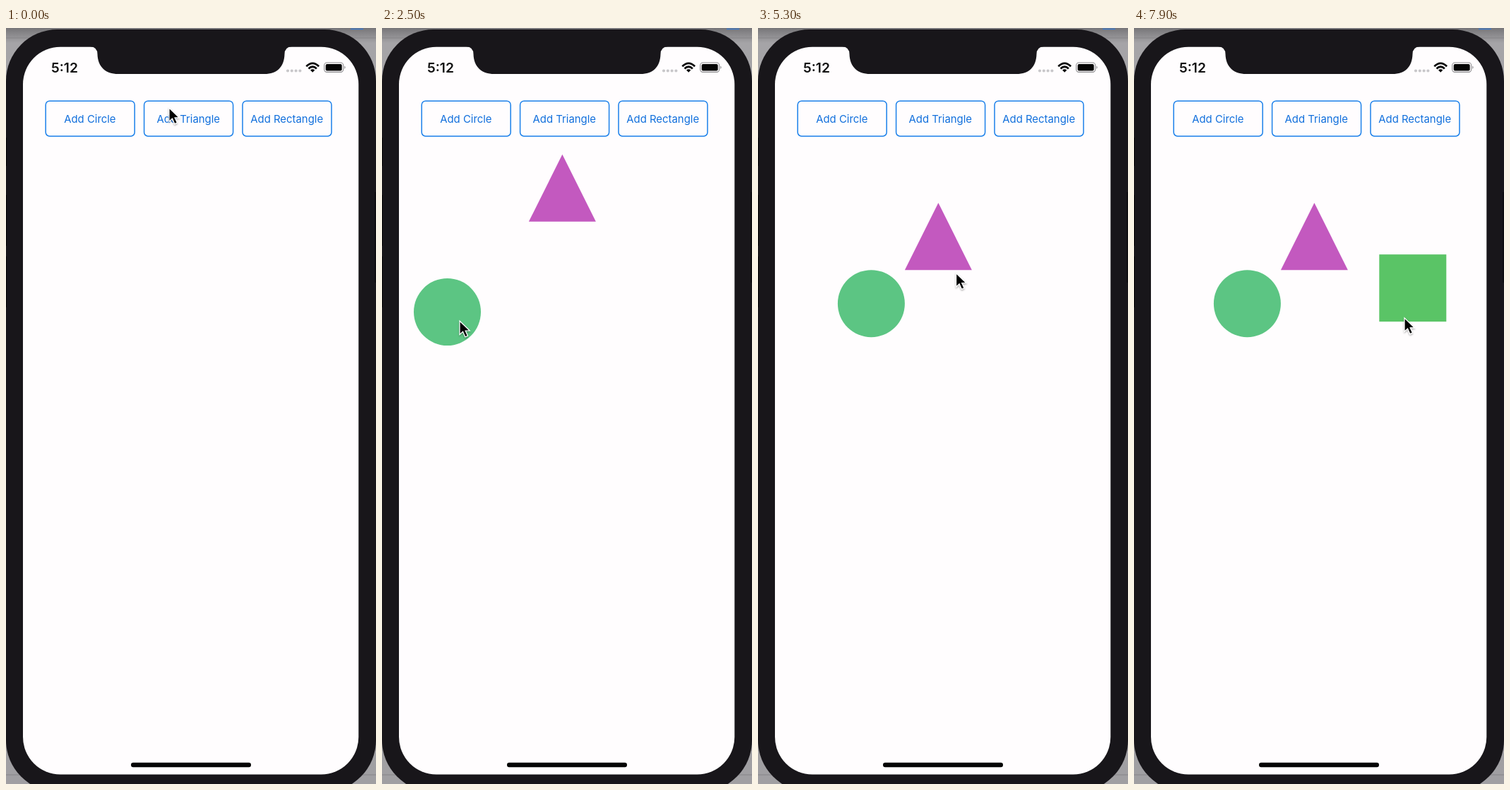
Write an HTML page that moves like this. It is 524x1069 px and loops after 8 s.

```html
<!DOCTYPE html>
<html lang="en">
<head>
<meta charset="utf-8">
<title>Shape alignment guides</title>
<style>
html, body { margin: 0; width: 100%; height: 100%; overflow: hidden; background: #aaa9ac; }
svg { display: block; width: 100vw; height: 100vh; }
text { font-family: Inter, "Liberation Sans", sans-serif; }
</style>
</head>
<body>
<svg viewBox="0 0 524 1069" preserveAspectRatio="none">
  <defs>
    <linearGradient id="shade" x2="0" y2="1">
      <stop offset="0" stop-color="#777679"/>
      <stop offset=".02" stop-color="#a5a4a7"/>
      <stop offset="1" stop-color="#a09fa2"/>
    </linearGradient>
    <filter id="soft" x="-50%" y="-50%" width="200%" height="200%">
      <feDropShadow dx="0" dy="1.5" stdDeviation="1.2" flood-opacity=".35"/>
    </filter>
  </defs>

  <rect width="524" height="1069" fill="url(#shade)"/>
  <path d="M0 14H524M0 1056H524" stroke="#858487"/>
  <path d="M488 1.5H506" stroke="#3d78c8" stroke-width="1.5"/>
  <rect y="2" width="524" height="1078" rx="73" fill="#18161a"/>
  <path d="M.5 155V195M.5 236V308M.5 323V395M523 232V360" stroke="#050506"/>
  <rect x="24" y="26.7" width="475.3" height="1028.8" rx="53" fill="#fffdfe"/>
  <path d="M119 26Q129.5 27 129.5 37C130 55 141 65 159 65H366C384 65 394 55 394.5 37Q394.5 27 405 26Z" fill="#18161a"/>

  <text x="64" y="62.6" font-size="19.2" font-weight="600" fill="#111">5:12</text>
  <path d="M399 60.5H417" stroke="#c8c7ca" stroke-width="4.2" stroke-linecap="round" stroke-dasharray="0 5.8"/>
  <g fill="none" stroke="#080808" stroke-width="2.7">
    <path d="M425.3 54.3Q434.2 45.4 443.1 54.3M428.5 57.5Q434.2 52 439.9 57.5"/>
    <path d="M431 59.4Q434.2 57 437.4 59.4L434.2 62.8Z" fill="#080808" stroke="none"/>
  </g>
  <rect x="450.7" y="49" width="27" height="13.4" rx="3.8" fill="none" stroke="#8c8b8e" stroke-width="1.1"/>
  <rect x="452.7" y="51" width="23" height="9.4" rx="2" fill="#050505"/>
  <path d="M479.3 53.5Q482 55.7 479.3 58Z" fill="#8c8b8e"/>
  <rect x="177" y="1038.8" width="170" height="6.4" rx="3.2" fill="#050505"/>

  <g id="buttons"></g>
  <circle id="circle" r="47.5" fill="#5cc583"/>
  <path id="triangle" d="M0-47.5L47.5 47.5H-47.5Z" fill="#c359bf"/>
  <rect id="square" x="-47.5" y="-47.5" width="95" height="95" fill="#5ac466"/>
  <path id="guides" fill="none" stroke="#dc2626" stroke-width="1.6"/>
  <path id="cursor" d="M0 0V19.2L4.5 15.1L7.8 22.6L11.4 21L8.1 13.8H14.2Z" fill="#000" stroke="#fff" stroke-width="1.2" filter="url(#soft)"/>
</svg>
<script>
const LOOP = 8000, STEP = 100;
const HALF = 47.5, SNAP = 7, GUIDE_HOLD = 300, COLUMN = 139.4;
const SHAPES = ['circle', 'triangle', 'square'];
const el = id => document.getElementById(id);

el('buttons').innerHTML = ['Circle', 'Triangle', 'Rectangle'].map((name, i) => {
  const x = 56.2 + COLUMN * i;
  return `<rect x="${x}" y="103.2" width="126" height="49.8" rx="5.5" fill="none" stroke="#1b80ea" stroke-width="1.5"/>
    <text x="${x + 62.7}" y="133.9" font-size="14.9" text-anchor="middle" fill="#116fdc">Add ${name}</text>`;
}).join('');

const glide = (start, end, x, y) => ({ start, end, to: [x, y] });
const press = (start, end, shape) =>
  ({ start, end, to: [113.5 + COLUMN * SHAPES.indexOf(shape), 144], adds: shape });
const drag = (start, end, shape, x, y) => ({ start, end, to: [x, y], drags: shape });

const script = [
  press(0, 500, 'circle'),
  press(800, 1500, 'triangle'),
  glide(1800, 2100, 133.5, 239),
  drag(2100, 2500, 'circle', 92.5, 401.5),
  drag(2500, 3100, 'circle', 166.5, 389.7),
  glide(3400, 3700, 282, 277),
  drag(3700, 4400, 'triangle', 292.5, 316.5),
  drag(4400, 5000, 'triangle', 254, 296),
  press(5400, 6000, 'square'),
  glide(6300, 6600, 397, 252),
  drag(6600, 7100, 'square', 394.8, 367.7),
  glide(7200, 7400, 364, 341),
  glide(7500, 7900, 383, 410)
];

const easeOut = u => 1 - (1 - u) ** 2;
const mix = (from, to, k) => from.map((v, i) => v + (to[i] - v) * k);

// Moves a dragged shape onto nearby edges of the others and returns the guide lines.
function snap(point, others) {
  const lines = [];
  for (const other of others) {
    for (const axis of [0, 1]) {
      for (const mine of [-HALF, HALF]) for (const theirs of [-HALF, HALF]) {
        const edge = other[axis] + theirs;
        if (Math.abs(point[axis] + mine - edge) > SNAP) continue;
        point[axis] = edge - mine;
        lines.push({ axis, edge, other });
      }
    }
  }
  return lines.map(({ axis, edge, other }) => {
    const ends = [point[1 - axis], other[1 - axis]];
    const low = Math.min(...ends) - HALF, high = Math.max(...ends) + HALF;
    return axis ? `M${low} ${edge}H${high}` : `M${edge} ${low}V${high}`;
  }).join('');
}

// Replays the script up to time t.
function stateAt(t) {
  const shapes = {};
  let cursor = [231, 113], guides = '';
  for (const { start, end, to, adds, drags } of script) {
    if (t <= start) break;
    const k = easeOut(Math.min(1, (t - start) / (end - start)));
    if (drags) {
      const from = shapes[drags], free = mix(from, to, k);
      cursor = cursor.map((v, i) => v + free[i] - from[i]);
      const others = SHAPES.filter(id => id !== drags && shapes[id]).map(id => shapes[id]);
      const lines = snap(free, others);
      shapes[drags] = free;
      guides = t < end + GUIDE_HOLD ? lines : '';
    } else {
      cursor = mix(cursor, to, k);
      if (adds && t >= end) shapes[adds] = [116 + COLUMN * SHAPES.indexOf(adds), 226.3];
    }
  }
  return { ...shapes, cursor, guides };
}

function draw(now) {
  const state = stateAt(Math.floor((now % LOOP) / STEP) * STEP);
  for (const id of [...SHAPES, 'cursor']) {
    el(id).setAttribute('visibility', state[id] ? 'visible' : 'hidden');
    if (state[id]) el(id).setAttribute('transform', `translate(${state[id]})`);
  }
  el('guides').setAttribute('d', state.guides);
}

const start = performance.now();
function tick() {
  draw(performance.now() - start);
  requestAnimationFrame(tick);
}
tick();
</script>
</body>
</html>
```
